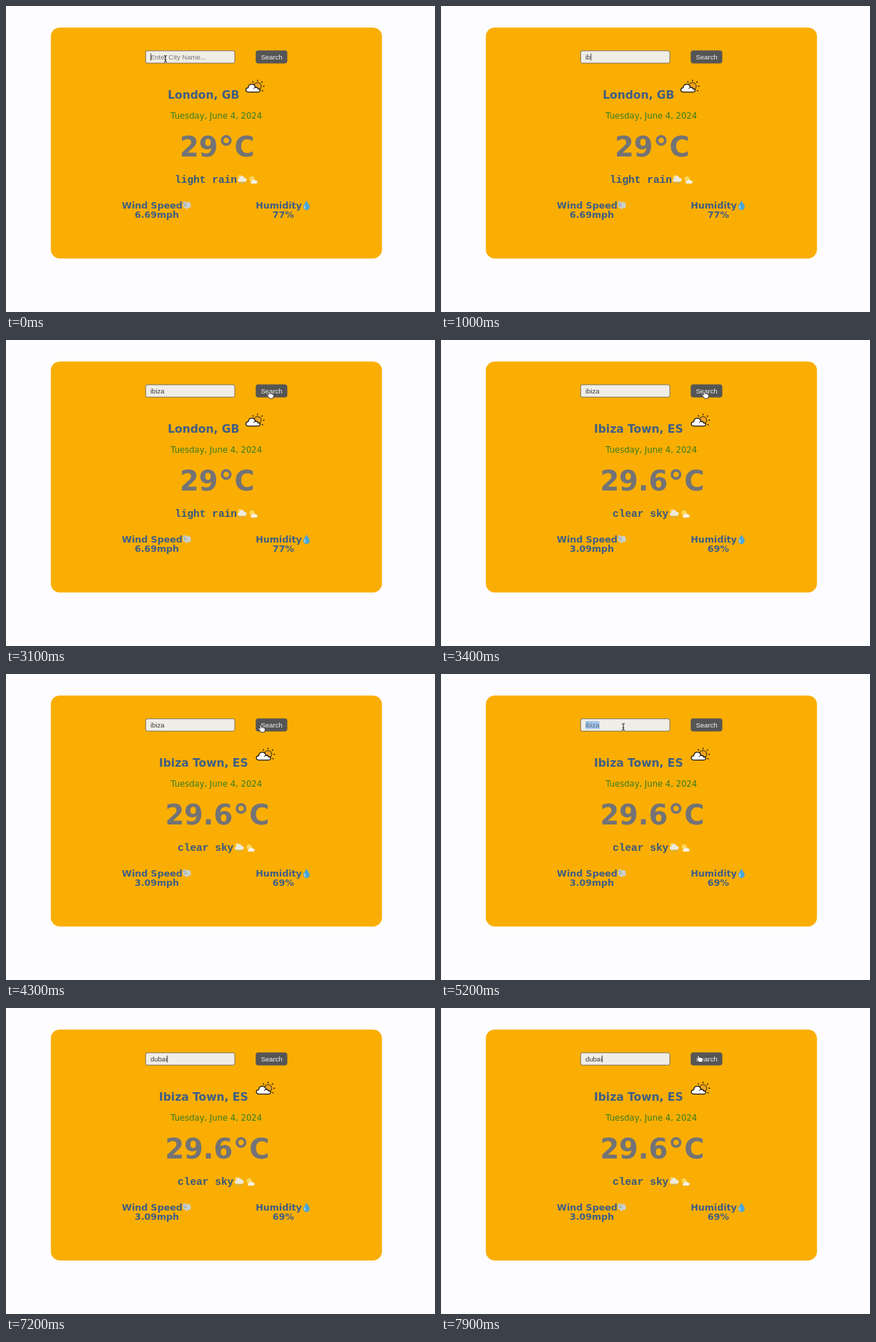
An HTML page that plays this animation: 600 by 429 pixels, repeating every 8 s.

```html
<!DOCTYPE html>
<html lang="en">
<head>
<meta charset="utf-8">
<title>Weather search</title>
<style>
  html, body { margin: 0; width: 100%; height: 100%; overflow: hidden; background: #fdfcfe; }
  svg { display: block; width: 600px; height: 429px; }
  text { white-space: pre; }
  .mid { text-anchor: middle; }
  .bold { font: bold 12.6px "DejaVu Sans", sans-serif; fill: #3f5e85; }
  #city { font-size: 15.5px; }
  #date { font: 11.6px "DejaVu Sans", sans-serif; fill: #387c22; }
  #temp { font-size: 38.4px; fill: #737376; }
  #degree { font-size: 1.2em; }
  #sky { font: bold 14.5px "Liberation Mono", monospace; fill: #36587f; }
  .ui { font: 9.5px "Liberation Sans", sans-serif; }
</style>
</head>
<body>
<svg viewBox="0 0 600 429">
  <rect x="62.7" y="30.2" width="463.1" height="323.8" rx="12.5" fill="#faae03"/>

  <rect x="195.3" y="62.8" width="124.7" height="17.3" rx="2.6" fill="#f0ede7" stroke="#70695c" stroke-width=".9"/>
  <rect id="selection" x="202" y="66" height="11" fill="#a5c8ec"/>
  <text id="field" class="ui" x="202" y="74.7"></text>
  <rect id="caret" y="66.5" width=".9" height="10" fill="#444"/>
  <rect x="349.5" y="62.5" width="43.7" height="17.8" rx="3" fill="#555" stroke="#6b6250" stroke-width=".6"/>
  <text class="ui mid" x="371.5" y="74.7" fill="#f4f4f4">Search</text>

  <text id="city" class="bold mid" x="276.3" y="130"></text>
  <g id="icon" stroke="#1c1810" stroke-width="1.3" stroke-linecap="round" stroke-linejoin="round">
    <path d="M351.8 104v1M345 106l.7.8M358.4 106.2l-.8.8M360 112.5h1M358.3 118.4l.8.7" fill="none"/>
    <circle cx="351.8" cy="112.5" r="5.2" fill="#eea321" stroke="#5d4516" stroke-width="1.2"/>
    <path d="M339 120.6c-4.600 0-4.800-5.600-.2-5.900.2-3.300 2.400-5 5-5 2.600 0 4.500 1.700 4.900 4.400 2.200-.4 3.300.6 3.500 1.900 4.300-.1 4.300 4.600.3 4.600z" fill="#fff"/>
    <path d="M346.500 115.800q.5-1.600 2.200-1.700" fill="none" stroke-width="1"/>
  </g>
  <text id="date" class="mid" x="294.2" y="157.5">Tuesday, June 4, 2024</text>
  <text id="temp" class="bold mid" x="295.4" y="211"><tspan id="degrees"></tspan><tspan id="degree" dy="5.4">°</tspan><tspan dy="-5.4">C</tspan></text>

  <text id="sky" y="248"></text>
  <g id="emoji">
    <circle cx="327.5" cy="240" r="3" fill="#fbd668"/>
    <path d="M326.500 246.500c-3.600-.2-3.200-4.600 0-4.700.4-4.400 6-4.600 6.800-.8 4.300-.4 4.300 5.400.4 5.500z" fill="#ece9df"/>
    <path d="M327.500 247.300l-.8 1.800M330.500 247.300l-.8 1.800M333.500 247.300l-.8 1.800" stroke="#83aebf"/>
    <circle cx="344" cy="242.300" r="3.500" fill="#ffd75a" stroke="#f5c33e" stroke-width=".8"/>
    <path d="M344 249c-2.800-.2-2.500-3.600 0-3.500.3-3 4.500-3 5.200-.6 3.500-.4 3.400 4.100.4 4.100z" fill="#f4f0e6"/>
  </g>

  <text class="bold" x="162" y="283.5">Wind Speed</text>
  <path d="M247.500 274.500c3-2 5 0 5 1.500 2-2.500 6.500-1 5.500 2 2 3-.5 6-3 5-2 2.500-4.500 2-4.500-.5-2 .5-3.500-1-3-2.500z" fill="#cad0cb"/>
  <path d="M247.500 276l4 1.500M249 280l4-.5" stroke="#8797a0" fill="none"/>

  <text id="wind" class="bold mid" x="211" y="297"></text>

  <text class="bold" x="349.2" y="283.5">Humidity</text>
  <path d="M420.300 272.500c1.500 4 4.500 6 4.500 9a4.500 4.500 0 0 1-9 0c0-3 3-5 4.500-9z" fill="#4aa5d8"/>
  <path d="M418.200 279.500q-1.500 3 1 4.300" stroke="#c1e6f5" fill="none" stroke-width="1.2"/>
  <text id="humidity" class="bold mid" x="387.8" y="297"></text>

  <g id="cursor">
    <path id="beam" d="M-2-4.500q2 0 2 1.200 0-1.200 2-1.200M0-3.300v7M-2 4.700q2 0 2-1.200 0 1.200 2 1.200M-1.200 1.500h2.400" fill="none" stroke="#222"/>
    <path id="arrow" d="M0 0v10l2.400-2.200 1.600 3.500 1.600-.7-1.600-3.400h3.200z" fill="#111" stroke="#fff" stroke-width=".7"/>
    <path id="hand" d="M-1.200-3.500c0-1.500 2-1.500 2 0l.5 2.500c.5-.8 1.600-.5 1.800.2.700-.5 1.600-.2 1.800.5 1-.2 1.500.5 1.500 1.300 0 2-.8 2.500-.9 4.500h-5C0 3.500-2 2.300-3.200.5c-.4-1 .8-1.500 1.600-.7l.9.8z" fill="#fff" stroke="#222" stroke-width=".8"/>
  </g>
</svg>
<script>
const LOOP = 8000, CLICK = 3000, LOADED = 3200, SELECT = 5000;
// The pointer hides while typing and returns at "wake"
const words = [
  { word: "ibiza", keys: [800, 950, 1100, 1250, 1400], wake: 2350 },
  { word: "dubai", keys: [6100, 6300, 6480, 6700, 6900], wake: 7400 }
];
const places = [
  { city: "London, GB", degrees: "29", sky: "light rain", wind: "6.69mph", humidity: "77%", skyX: 236, iconX: 0, emojiX: 0 },
  { city: "Ibiza Town, ES", degrees: "29.6", sky: "clear sky", wind: "3.09mph", humidity: "69%", skyX: 240, iconX: 14.7, emojiX: -4 }
];
// Pointer moves: start, end, from, to
const moves = [
  [2350, 2400, [223, 74], [250, 74]],
  [2400, 2900, [250, 74], [368, 76.5]],
  [4200, 4700, [368, 76.5], [255, 74]],
  [7400, 7900, [255, 74], [360, 70.5]]
];
const $ = id => document.getElementById(id);
const show = (id, on) => $(id).style.visibility = on ? "inherit" : "hidden";
const shift = (id, x, y = 0) => $(id).setAttribute("transform", `translate(${x} ${y})`);

function pointerAt(t) {
  let [x, y] = moves[0][2];
  for (const [start, end, from, to] of moves) {
    if (t < start) break;
    const p = Math.min(1, (t - start) / (end - start));
    const ease = p * p * (3 - 2 * p);
    x = from[0] + (to[0] - from[0]) * ease;
    y = from[1] + (to[1] - from[1]) * ease;
  }
  return [x, y];
}

function drawField(t) {
  const second = t >= words[1].keys[0];
  const { word, keys } = words[+second];
  const pressed = keys.filter(k => k <= t);
  const typed = word.slice(0, pressed.length);
  const selected = t >= SELECT && !second;
  const field = $("field");
  field.textContent = typed || "Enter City Name...";
  field.setAttribute("fill", typed ? (selected ? "#53677d" : "#3c3c3c") : "#757575");

  const width = typed ? field.getComputedTextLength() : 0;
  $("selection").setAttribute("width", width);
  show("selection", selected);
  $("caret").setAttribute("x", 202 + width);
  const idle = t - (pressed.at(-1) ?? 0);
  const focused = t < CLICK || second;
  show("caret", focused && idle % 1000 < 500);
}

function drawPlace(t) {
  const place = places[+(t >= LOADED)];
  for (const id of ["city", "degrees", "sky", "wind", "humidity"]) $(id).textContent = place[id];
  $("sky").setAttribute("x", place.skyX);
  shift("icon", place.iconX);
  shift("emoji", place.emojiX);
}

function drawPointer(t) {
  const [x, y] = pointerAt(t);
  const typing = words.some(({ keys, wake }) => t >= keys[0] && t < wake);
  shift("cursor", x, y);
  show("cursor", !typing);
  show("beam", x < 320);
  show("arrow", x >= 320 && x < 349);
  show("hand", x >= 349);
}

function frame(now) {
  const t = now % LOOP;
  drawField(t);
  drawPlace(t);
  drawPointer(t);
  requestAnimationFrame(frame);
}
frame(performance.now());
</script>
</body>
</html>
```
